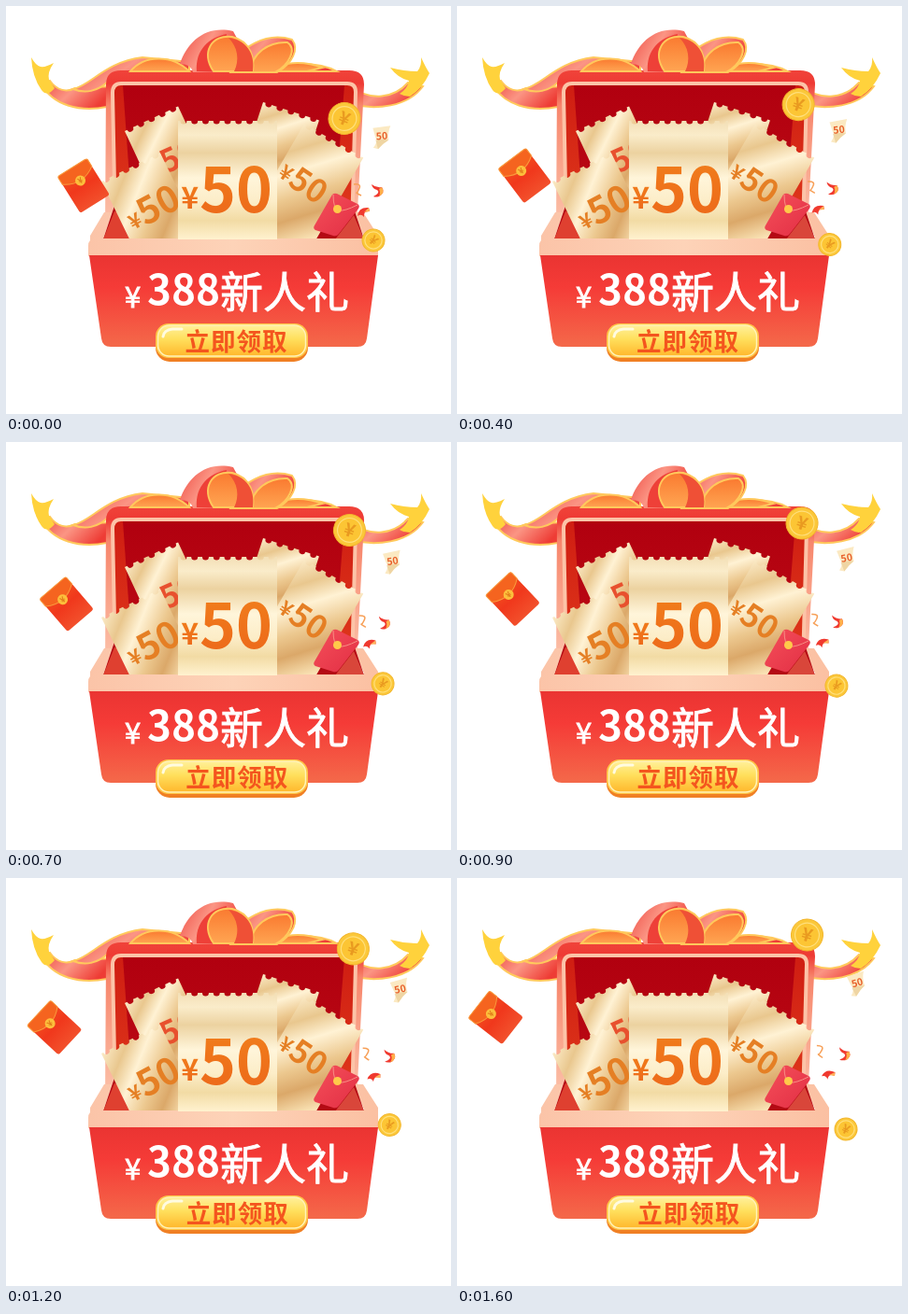
Recreate the animation shown at these times as an HTML page. Size 476 by 437 pixels, loop 1.7 s.

```html
<!DOCTYPE html>
<html lang="zh">
<head>
<meta charset="utf-8">
<style>
html, body { margin: 0; width: 100%; height: 100%; overflow: hidden; background: #fff; }
svg { display: block; width: 476px; height: 437px; }
text { font-family: "Noto Sans CJK SC", "Noto Sans CJK", "Noto Sans", sans-serif; font-weight: 700; }
.mid { text-anchor: middle; }
.medium { font-weight: 400; stroke: #fff; stroke-width: .9; }
.gold { stroke: #ffc95c; stroke-width: 2; }
</style>
</head>
<body>
<svg viewBox="0 0 476 437">
<defs>
  <linearGradient id="paper" x2="0" y2="1">
    <stop stop-color="#f3dfb6"/><stop offset=".12" stop-color="#faecca"/><stop offset=".27" stop-color="#ecd2a0"/>
    <stop offset=".48" stop-color="#fff5da"/><stop offset=".68" stop-color="#fcedc8"/><stop offset=".84" stop-color="#f2dba4"/><stop offset="1" stop-color="#fff2cf"/>
  </linearGradient>
  <linearGradient id="shaded" x2=".6" y2="1">
    <stop stop-color="#fbeac6"/><stop offset=".2" stop-color="#e9c78e"/><stop offset=".38" stop-color="#fff2d4"/>
    <stop offset=".6" stop-color="#ecc88f"/><stop offset=".78" stop-color="#dba869"/><stop offset="1" stop-color="#fbe5b8"/>
  </linearGradient>
  <linearGradient id="lid" x2="0" y2="1">
    <stop stop-color="#f0433a"/><stop offset=".08" stop-color="#ee3a34"/><stop offset=".22" stop-color="#f7866c"/><stop offset="1" stop-color="#fcc5ad"/>
  </linearGradient>
  <linearGradient id="side-wall" x2="0" y2="1"><stop stop-color="#cf1d12"/><stop offset="1" stop-color="#e03a1c"/></linearGradient>
  <linearGradient id="inside" x2="0" y2="1"><stop stop-color="#b1000f"/><stop offset="1" stop-color="#bb0a14"/></linearGradient>
  <linearGradient id="front" x2="0" y2="1">
    <stop stop-color="#ea3432"/><stop offset=".35" stop-color="#f53b37"/><stop offset="1" stop-color="#f4694a"/>
  </linearGradient>
  <linearGradient id="rim" x2="1"><stop stop-color="#fbc4a8"/><stop offset=".5" stop-color="#fdd3b8"/><stop offset="1" stop-color="#fbc0a2"/></linearGradient>
  <linearGradient id="button" x2="0" y2="1"><stop stop-color="#fff09a"/><stop offset=".45" stop-color="#ffdf5c"/><stop offset="1" stop-color="#ffb72c"/></linearGradient>
  <linearGradient id="price" x2="0" y2="1"><stop stop-color="#f2841c"/><stop offset="1" stop-color="#ec651a"/></linearGradient>
  <linearGradient id="silk" x2="1" y2=".4"><stop stop-color="#ee4a42"/><stop offset=".5" stop-color="#fb9584"/><stop offset="1" stop-color="#ee3c35"/></linearGradient>
  <linearGradient id="loop" x2="0" y2="1"><stop stop-color="#fa7a30"/><stop offset="1" stop-color="#ffa552"/></linearGradient>
  <linearGradient id="packet" x2="0" y2="1"><stop stop-color="#f4561f"/><stop offset=".5" stop-color="#f0381c"/><stop offset="1" stop-color="#f2502c"/></linearGradient>
  <linearGradient id="pink" x2="1" y2="1"><stop stop-color="#f5505a"/><stop offset="1" stop-color="#e22e44"/></linearGradient>
  <clipPath id="opening"><path d="M90 90H400V230L380 249H102L90 230Z"/></clipPath>
</defs>

<!-- ribbon tails -->
<path fill="url(#silk)" class="gold" d="M38 84C50 106 78 114 108 108L113 86L74 88C64 93 54 90 47 80Z"/>
<path fill="url(#silk)" class="gold" d="M72 89C92 84 106 60 146 55L196 60V74H118L110 80C98 92 84 94 72 89Z"/>
<path fill="#ffd23c" d="M27 55Q32 64 37 65T51 61Q44 71 46 79L52 88Q44 98 38 90Q28 76 27 55Z"/>
<path fill="url(#silk)" class="gold" d="M366 84C390 104 416 98 430 82L446 86C430 108 396 112 368 105Z"/>
<path fill="#ffd23c" d="M411 66Q426 70 440 70Q445 64 444 55Q449 66 453 72Q445 89 432 97Q426 97 421 94Q430 88 431 80Q419 77 411 66Z"/>

<!-- lid -->
<path fill="url(#lid)" d="M107 84Q107 69 123 69H367Q383 69 383 84L375 240H106Z"/>
<path fill="url(#side-wall)" stroke="#fcc4a8" stroke-width="4" d="M114 93Q114 83 123 83H365Q374 83 374 92L370 240H117Z"/>
<path fill="url(#inside)" d="M125 85H362L352 212H134Z"/>
<path stroke="#fbd9c4" stroke-width="1.5" d="M338 211H360"/>

<!-- bow -->
<path fill="url(#loop)" class="gold" d="M133 70C148 52 178 52 196 70Z"/>
<path fill="url(#silk)" class="gold" d="M272 70C296 58 336 60 354 70Z"/>
<path fill="url(#loop)" class="gold" d="M278 70C294 60 318 58 338 66L322 70Z"/>
<path fill="url(#silk)" d="M186 62C194 38 214 20 243 27L252 44L236 71H200Q198 62 186 62Z"/>
<path fill="#ee4038" d="M204 70C202 48 216 34 236 30L228 70Z"/>
<path fill="url(#silk)" class="gold" d="M240 71C248 42 280 28 306 36C314 46 306 62 290 71Z"/>
<path fill="url(#loop)" class="gold" d="M262 71C262 50 282 38 301 39C312 46 302 64 288 71Z"/>
<path fill="url(#loop)" class="gold" d="M222 70C208 50 220 30 242 33C262 38 266 56 264 70Z"/>
<path fill="#ef5036" d="M244 70C250 58 248 44 238 34C262 38 266 56 264 70Z"/>

<!-- box opening -->
<path fill="url(#rim)" d="M105 221H115L105 248H383L371 221H382L398 246V267H90V246Z"/>
<path fill="#b40a14" d="M116 214H371L383 250H104Z"/>
<path fill="#df4030" d="M116 220L104 250H134L122 221Z"/>
<path fill="#e8604a" opacity=".7" d="M352 250L372 224L383 250Z"/>

<!-- coupons -->
<g id="side" clip-path="url(#opening)"></g>
<path fill="url(#rim)" d="M96 249H391Q398 249 398 257V268H88V257Q88 249 96 249Z"/>
<g id="main"></g>

<!-- box front -->
<path fill="url(#front)" d="M89 267H398L386 356Q385 365 376 365H112Q103 365 102 356Z"/>
<g fill="#fff">
  <text class="medium" x="127" y="323" font-size="31">¥</text>
  <text x="151" y="320" font-size="44">388</text>
  <text class="medium" x="229" y="323" font-size="46">新人礼</text>
</g>

<!-- button -->
<rect x="160" y="342" width="163" height="39" rx="15" fill="#f08024"/>
<rect x="160" y="340" width="163" height="37" rx="14" fill="#ffc648"/>
<rect x="162.500" y="342" width="158" height="33" rx="12" fill="url(#button)" stroke="#fff3b8" stroke-width="1.500"/>
<path fill="none" stroke="#fffbe0" stroke-width="3" stroke-linecap="round" d="M168 354Q169 347 178 346H188"/>
<text id="label" class="mid" y="369" font-size="26.500" letter-spacing="1" fill="#f4551e">立即领取</text>

<!-- packet inside the box -->
<path fill="url(#pink)" d="M349 202Q351 200 354 201L376 212Q379 214 377 217L356 244Q354 247 350 246L331 240Q328 238 330 235Z"/>
<path fill="none" stroke="#f88f84" d="M350 202Q350 218 356 219T376 213"/>
<circle cx="354.500" cy="217.500" r="4.500" fill="#ffc94a"/>

<!-- flying pieces -->
<g id="curl"><path fill="none" stroke="#f7a058" stroke-width="1.500" d="M-4-6Q4-7 2-2T-1 3T4 6"/></g>
<g id="flake"><path fill="#f0392f" d="M-6-7Q-1-3 5-4Q9 2 2 6Q-2 7-4 6Q4 2 0-1Q-5-2-6-7Z"/><path fill="#ffb04a" d="M5-4Q9 2 2 6Q4 2 2-2Z"/></g>
<g id="chip"><path fill="#f0392f" d="M-7 4Q-6-6 5-5L6-1Q-1-2 0 5Q-3 1-7 4Z"/><path fill="#ffb35a" d="M5-5L6-1L0 0Z"/></g>
<g id="slip">
  <path fill="#fbe9c2" d="M-9-9L10-10Q6-2 7 5Q1 8-5 14L-10 12Q-4 6-7 1Z"/>
  <path fill="#e8c88e" d="M-7 4Q0 3 7 5Q1 8-5 14Z" opacity=".6"/>
  <text class="mid" y="4" font-size="10.500" fill="#e8602a">50</text>
</g>
<g id="envelope">
  <rect x="-18.500" y="-23" width="37" height="46" rx="2.500" fill="url(#packet)"/>
  <path fill="#f5641f" stroke="#f99a3c" d="M-18.500-21Q-18.500-23-16-23H16Q18.500-23 18.500-21V-13Q0 0-18.500-13Z"/>
  <circle cy="-6.500" r="5.500" fill="#fcbf3c"/>
  <text class="mid" y="-3.500" font-size="8.500" fill="#e07a18">¥</text>
</g>
<g id="bigCoin"></g>
<g id="smallCoin"></g>
</svg>
<script>
const el = id => document.getElementById(id);

function coupon(parent, fill, x, y, angle, w, h, notches) {
  const gap = w / notches - 7;
  const edge = `h${gap / 2}a3.5 3.5 0 0 0 7 0h${gap / 2}`.repeat(notches);
  el(parent).innerHTML +=
    `<path fill="url(#${fill})" transform="translate(${x} ${y}) rotate(${angle})" d="M0 0${edge}v${h}h${-w}z"/>`;
}

function price(parent, x, y, angle, size, yenSize, fill) {
  el(parent).innerHTML += `<g fill="${fill}" transform="translate(${x} ${y}) rotate(${angle})">
    <text x="${-yenSize * 0.62}" y="${-size * 0.06}" font-size="${yenSize}">¥</text>
    <text font-size="${size}">50</text></g>`;
}

function coin(id, r) {
  el(id).innerHTML = `<circle r="${r}" fill="#fbc83a" stroke="#f3b62c"/>
    <circle r="${r * 0.76}" fill="#fcc534" stroke="#ffdf7c" stroke-width="1.2"/>
    <text class="mid" y="${r * 0.4}" font-size="${r * 1.15}" fill="#e99a20">¥</text>`;
}

coupon("side", "shaded", 127, 134, -25, 63, 84, 5);
price("side", 171, 180, -24, 34, 22, "#e8502e");
coupon("side", "shaded", 275, 103, 18, 63, 75, 5);
coupon("side", "shaded", 102, 188, -26, 70, 105, 6);
price("side", 149, 236, -28, 39, 22, "#e57f24");
coupon("side", "shaded", 319, 126, 30, 73, 130, 6);
price("side", 300, 191, 34, 34, 22, "#e57f24");
coupon("main", "paper", 184, 123, 0, 106, 127, 9);
price("main", 207, 220.5, 0, 66, 32, "url(#price)");
coin("bigCoin", 17);
coin("smallCoin", 12);

// id, start x, y, angle, then end x, y, angle
const paths = [
  ["envelope", 83, 192.5, -32, 41.5, 149.5, -52],
  ["bigCoin", 362, 120.5, 22, 374.5, 61, 16],
  ["smallCoin", 393, 251, 45, 416, 269, 25],
  ["slip", 402, 139, -4, 428, 112, -16],
  ["curl", 376, 197, 0, 388, 186, 8],
  ["flake", 397, 198, 0, 414, 189, 8],
  ["chip", 383, 221, 0, 398, 211, 20],
  ["label", 246.5, 0, 0, 248.2, 0, 0],
];

function draw(now) {
  const k = Math.floor(now % 1700 / 100) / 16;
  for (const [id, x0, y0, a0, x1, y1, a1] of paths) {
    const mix = (a, b) => a + (b - a) * k;
    el(id).setAttribute("transform", `translate(${mix(x0, x1)} ${mix(y0, y1)}) rotate(${mix(a0, a1)})`);
  }
  requestAnimationFrame(draw);
}
draw(performance.now());
</script>
</body>
</html>
```
